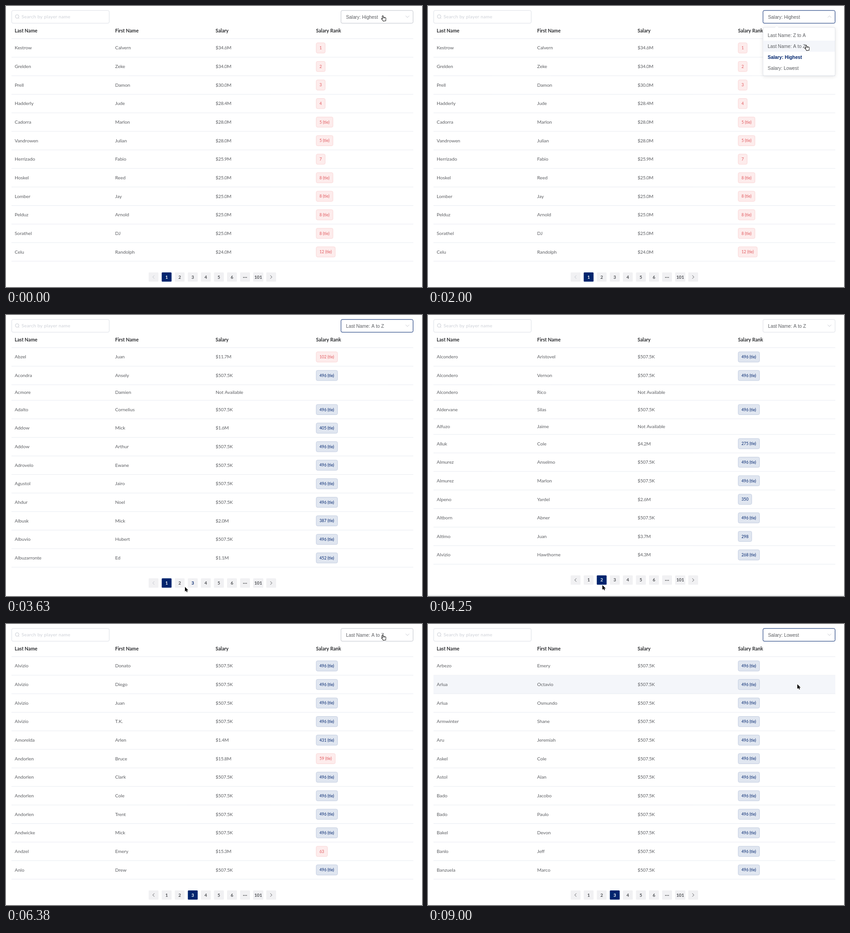
An HTML page with a canvas for the animation above (9.87 s loop, 909 by 616 pixels).

```html
<!DOCTYPE html>
<html lang="en">
<head>
<meta charset="utf-8">
<title>Salary table</title>
<style>
html, body { margin: 0; width: 100%; height: 100%; overflow: hidden; background: #fff; }
canvas { display: block; width: 909px; height: 616px; }
</style>
</head>
<body>
<canvas id="stage"></canvas>
<script>
const W = 909, H = 616, LOOP = 9870, TICK = 125;
const NAVY = '#00256e', TEXT = '#5c5e62', FAINT = '#c0c4cc', LINE = '#e6e9f0', HOVER = '#f4f6fa';
const SANS = 'Lato, "Open Sans", sans-serif';
const ARIAL = '"Liberation Sans", Arial, sans-serif';
const LEFT = 12, RIGHT = 890, TOP = 71.6, COLS = [19, 238.5, 458, 677.5];
const OPTIONS = ['Last Name: Z to A', 'Last Name: A to Z', 'Salary: Highest', 'Salary: Lowest'];
const LABELS = ['<', '1', '2', '3', '4', '5', '6', '...', '101', '>'];

// "Last First salary rank"; a trailing t marks a tie, "-" a missing salary
const parse = list => list.split(',').map(line => {
  const [last, first, pay = '507.5K', rank = '496t'] = line.trim().split(' ');
  return { last, first, pay, rank, h: pay === '-' ? 34.1 : 40.65 };
});
const highest = parse(`Kestrow Calvern 34.6M 1, Grelden Zeke 34.0M 2, Prell Damon 30.0M 3,
  Hadderly Jude 28.4M 4, Cadorra Marlon 28.0M 5t, Vandrowen Julian 28.0M 5t, Herrizado Fabio 25.9M 7,
  Hoskel Reed 25.0M 8t, Lomber Jay 25.0M 8t, Pelduz Arnold 25.0M 8t, Sorathel DJ 25.0M 8t,
  Celu Randolph 24.0M 12t`);
const byName1 = parse(`Abzel Juan 11.7M 102t, Acondra Ansely, Acmore Damien -, Adalto Cornelius,
  Addow Mick 1.6M 405t, Addow Arthur, Adrovelo Ewane, Agustol Jairo, Ahdur Noel,
  Albusk Mick 2.0M 387t, Albuvio Hubert, Albuzarronte Ed 1.1M 452t`);
const byName2 = parse(`Alcondero Aristovel, Alcondero Vernon, Alcondero Rico -, Aldervane Silas,
  Alfuzo Jaime -, Alluk Cole 4.2M 275t, Almurez Anselmo, Almurez Marlon, Alpeno Yardel 2.6M 350,
  Altborn Abner, Altimo Juan 3.7M 298, Alvizio Hawthorne 4.3M 268t`);
const byName3 = parse(`Alvizio Donato, Alvizio Diego, Alvizio Juan, Alvizio T.K.,
  Amorelda Arlen 1.4M 431t, Andorlen Bruce 15.8M 59t, Andorlen Clark, Andorlen Cole, Andorlen Trent,
  Andwicke Mick, Andzel Emery 15.3M 63, Anlo Drew`);
const lowest = parse(`Arbezo Emery, Arlua Octavio, Arlua Osmundo, Armwinter Shane, Aru Jeremiah,
  Askel Cole, Astol Alan, Bado Jacobo, Bado Paulo, Bakel Devon, Banlo Jeff, Banzuela Marco`);

// Each view starts at a tick
const VIEWS = [
  { at: 0, rows: highest, page: 1, pick: 2 },
  { at: 19, rows: byName1, page: 1, pick: 1 },
  { at: 32, rows: byName2, page: 2, pick: 1 },
  { at: 42, rows: byName3, page: 3, pick: 1 },
  { at: 68, rows: lowest, page: 3, pick: 3 }
];

// Pointer stops: tick, x, y
const STOPS = [
  [0, 823, 21.5], [7, 823, 21.5], [13, 813, 101], [15, 813, 101], [16, 826, 86], [23, 826, 86],
  [24, 640, 330], [25, 344, 586], [26, 344, 586], [27, 372, 590], [28, 405, 590], [29, 391, 596],
  [30, 384, 593], [32, 381, 592], [34, 381, 592], [40, 409.5, 583], [43, 409.5, 583],
  [51, 823, 24], [54, 823, 24], [58, 805.5, 112], [62, 805.5, 112], [67, 807, 132], [80, 807, 132]
];

const canvas = document.getElementById('stage');
const ctx = canvas.getContext('2d');
const dpr = window.devicePixelRatio || 1;
canvas.width = Math.round(W * dpr);
canvas.height = Math.round(H * dpr);

const clamp = v => Math.max(0, Math.min(1, v));
const inside = (p, x, y, w, h) => p.x >= x && p.x < x + w && p.y >= y && p.y < y + h;

function pointer(k) {
  const i = Math.max(1, STOPS.findIndex(s => s[0] >= k));
  const [t0, x0, y0] = STOPS[i - 1], [t1, x1, y1] = STOPS[i];
  const u = clamp((k - t0) / (t1 - t0)), e = u * u * (3 - 2 * u);
  return { x: x0 + (x1 - x0) * e, y: y0 + (y1 - y0) * e };
}

function menuOpen(k) {
  const rise = at => clamp((k - at) / 2.6), fall = at => clamp((k - at) / 2.3);
  return clamp(rise(1.4) - fall(18.7) + rise(52.4) - fall(67.7));
}

function text(str, x, y, color, font, align = 'left', spacing = 0) {
  ctx.font = font;
  ctx.fillStyle = color;
  ctx.textAlign = align;
  ctx.letterSpacing = spacing + 'px';
  ctx.fillText(str, x, y);
}

function box(x, y, w, h, r, fill, stroke) {
  ctx.beginPath();
  ctx.roundRect(x, y, w, h, r);
  if (fill) { ctx.fillStyle = fill; ctx.fill(); }
  if (stroke) { ctx.strokeStyle = stroke; ctx.lineWidth = 1; ctx.stroke(); }
}

function poly(points, color, width = 1) {
  ctx.beginPath();
  points.forEach(([x, y]) => ctx.lineTo(x, y));
  ctx.strokeStyle = color;
  ctx.lineWidth = width;
  ctx.stroke();
}

const rule = (y, x0, x1, color) => poly([[x0, y], [x1, y]], color, 0.9);

function drawSearch() {
  box(12.5, 9.8, 213, 28, 3, '#fff', '#dcdfe6');
  ctx.beginPath();
  ctx.arc(24.3, 23, 3.9, 0, 7);
  ctx.strokeStyle = FAINT;
  ctx.lineWidth = 0.9;
  ctx.stroke();
  poly([[27.2, 25.9], [29, 27.7]], FAINT, 0.9);
  text('Search by player name', 34, 27.4, '#cdd0d7', `10.3px ${SANS}`, 'left', 0.25);
}

function drawSelect(label, open, focus, hover) {
  box(732, 9.8, 157.5, 28, 3, '#fff', focus ? NAVY : hover ? FAINT : '#dcdfe6');
  text(label, 743, 27.5, TEXT, `10.3px ${ARIAL}`);
  const d = 2 - 4 * open;
  poly([[873.3, 23.4 - d], [877.2, 23.4 + d], [881.1, 23.4 - d]], FAINT, 0.9);
}

function drawTag(rank, mid) {
  const tie = rank.endsWith('t'), n = parseInt(rank), high = n < 200;
  const w = 15.3 + 5 * String(n).length + (tie ? 17 : 0);
  box(677.9, mid - 11.2, w - 0.8, 22.4, 3, high ? '#fdecec' : '#e0e6f0', high ? '#fad6d7' : '#c3cde0');
  text(n + (tie ? ' (tie)' : ''), 685, mid + 3.2, high ? '#e0585d' : NAVY, `8.8px ${SANS}`);
}

function drawTable(rows, cursor, canHover) {
  ['Last Name', 'First Name', 'Salary', 'Salary Rank'].forEach((s, i) =>
    text(s, COLS[i], 58, '#2b2c2f', `bold 10.5px ${SANS}`));
  rule(TOP, LEFT, RIGHT, LINE);
  let y = TOP;
  const font = `10.3px ${SANS}`;
  for (const row of rows) {
    const mid = y + row.h / 2, base = mid + 3.5;
    if (canHover && inside(cursor, LEFT, y, RIGHT - LEFT, row.h)) {
      ctx.fillStyle = HOVER;
      ctx.fillRect(LEFT, y, RIGHT - LEFT, row.h);
    }
    text(row.last, COLS[0], base, TEXT, font);
    text(row.first, COLS[1], base, TEXT, font);
    if (row.pay === '-') {
      text('Not Available', COLS[2], base, TEXT, font);
    } else {
      text('$' + row.pay, COLS[2], base, TEXT, font, 'left', -0.25);
      drawTag(row.rank, mid);
    }
    y += row.h;
    rule(y, LEFT, RIGHT, LINE);
  }
  return y;
}

const buttonX = i => 311.7 + 28.55 * i;

function drawPager(y, page, hovered) {
  LABELS.forEach((label, i) => {
    const x = buttonX(i), cx = x + 10.7, cy = y + 10.2, active = i === page;
    box(x, y, i === 8 ? 22.2 : 21.5, 20.4, 1.5, active ? NAVY : '#f1f1f3');
    if (label === '<' || label === '>') {
      const d = label === '<' ? 1.8 : -1.8;
      poly([[cx + d, cy - 3.6], [cx - d, cy], [cx + d, cy + 3.6]], i === 0 && page === 1 ? FAINT : '#55575b', 1);
    } else if (label === '...') {
      ctx.fillStyle = '#45474b';
      for (const dx of [-3.2, 0, 3.2]) {
        ctx.beginPath();
        ctx.arc(cx + dx, cy + 0.8, 1, 0, 7);
        ctx.fill();
      }
    } else {
      const color = active ? '#fff' : i === hovered ? NAVY : '#4c4e52';
      text(label, cx + (i === 8 ? 0.3 : 0), cy + 3.4, color, `bold 9.6px ${SANS}`, 'center');
    }
  });
  rule(y + 43.7, 0, W, '#dedfe2');
}

function drawMenu(open, pick, cursor) {
  if (open <= 0) return;
  ctx.save();
  ctx.globalAlpha = open;
  ctx.translate(0, 46.5);
  ctx.scale(1, open);
  ctx.translate(0, -46.5);
  ctx.shadowColor = 'rgba(0,0,0,.12)';
  ctx.shadowBlur = 9 * dpr;
  ctx.shadowOffsetY = 1.5 * dpr;
  box(732, 46.8, 157.5, 106, 3, '#fff');
  ctx.shadowColor = 'transparent';
  box(732, 46.8, 157.5, 106, 3, null, '#e2e5eb');
  ctx.beginPath();
  ctx.moveTo(757.5, 47.5);
  ctx.lineTo(762, 43);
  ctx.lineTo(766.5, 47.5);
  ctx.fillStyle = '#fff';
  ctx.fill();
  ctx.strokeStyle = '#ebeef5';
  ctx.lineWidth = 0.7;
  ctx.stroke();
  const over = cursor.y > 51.8 ? Math.floor((cursor.y - 51.8) / 24.25) : pick;
  OPTIONS.forEach((label, i) => {
    const y = 51.8 + 24.25 * i;
    if (i === over) {
      ctx.fillStyle = HOVER;
      ctx.fillRect(732.5, y, 156.5, 24.25);
    }
    const bold = i === pick;
    text(label, 742.3, y + 15.7, bold ? NAVY : TEXT, `${bold ? 'bold ' : ''}10.3px ${ARIAL}`);
  });
  ctx.restore();
}

const ARROW = new Path2D('M0 0V10.2L2.4 8L4 11.6L5.7 10.9L4.2 7.4H7.3Z');
const HAND = new Path2D('M-1.2 1Q-1.2-.1 0-.1T1.2 1V4Q2.2 3.2 3 4.4Q4 3.7 4.7 4.9Q6.2 4.5 6.2 6.2' +
  'Q6.4 8.4 5.4 9.8V11.8H-.4Q-.6 10.6-2 8.6L-3.4 6.4Q-3.3 5-2.1 5.6L-1.2 6.6Z');

function drawCursor({ x, y }, hand) {
  ctx.save();
  ctx.translate(x, y);
  ctx.lineJoin = 'round';
  if (hand) {
    ctx.rotate(-0.14);
    ctx.fillStyle = '#fff';
    ctx.strokeStyle = '#111';
    ctx.lineWidth = 1;
    ctx.fill(HAND);
    ctx.stroke(HAND);
    for (const lx of [1.2, 3]) poly([[lx, 4.2], [lx, 6]], '#111', 0.7);
  } else {
    ctx.strokeStyle = '#fff';
    ctx.lineWidth = 1.5;
    ctx.stroke(ARROW);
    ctx.fillStyle = '#000';
    ctx.fill(ARROW);
  }
  ctx.restore();
}

function draw(k) {
  const view = VIEWS.filter(v => v.at <= k).pop();
  const cursor = pointer(k), open = menuOpen(k);
  const onSelect = inside(cursor, 731, 9, 159, 29);
  const onMenu = open > 0 && inside(cursor, 732, 46, 158, 107);
  const focus = (k >= 1 && k < 32) || k >= 52;

  ctx.setTransform(dpr, 0, 0, dpr, 0, 0);
  ctx.fillStyle = '#fff';
  ctx.fillRect(0, 0, W, H);
  const pagerY = drawTable(view.rows, cursor, !onMenu) + 24.5;
  const buttonAt = p => LABELS.findIndex((_, i) => inside(p, buttonX(i), pagerY, 21.5, 20.4));
  // Hover colour trails the pointer by one tick
  drawPager(pagerY, view.page, buttonAt(pointer(Math.max(0, k - 1))));
  drawSearch();
  drawSelect(OPTIONS[view.pick], open, focus, onSelect);
  drawMenu(open, view.pick, cursor);
  const button = buttonAt(cursor);
  drawCursor(cursor, onSelect || onMenu || (button >= 0 && button !== view.page));
}

// Ticks fall on whole hundredths of a second
function tickAt(t) {
  const k = Math.floor(t / TICK);
  return t < Math.ceil(k * TICK / 10) * 10 ? k - 1 : k;
}

let start = null;
function frame(now) {
  if (start === null) start = now;
  draw(tickAt((now - start) % LOOP));
  requestAnimationFrame(frame);
}
draw(0);
requestAnimationFrame(frame);
</script>
</body>
</html>
```
